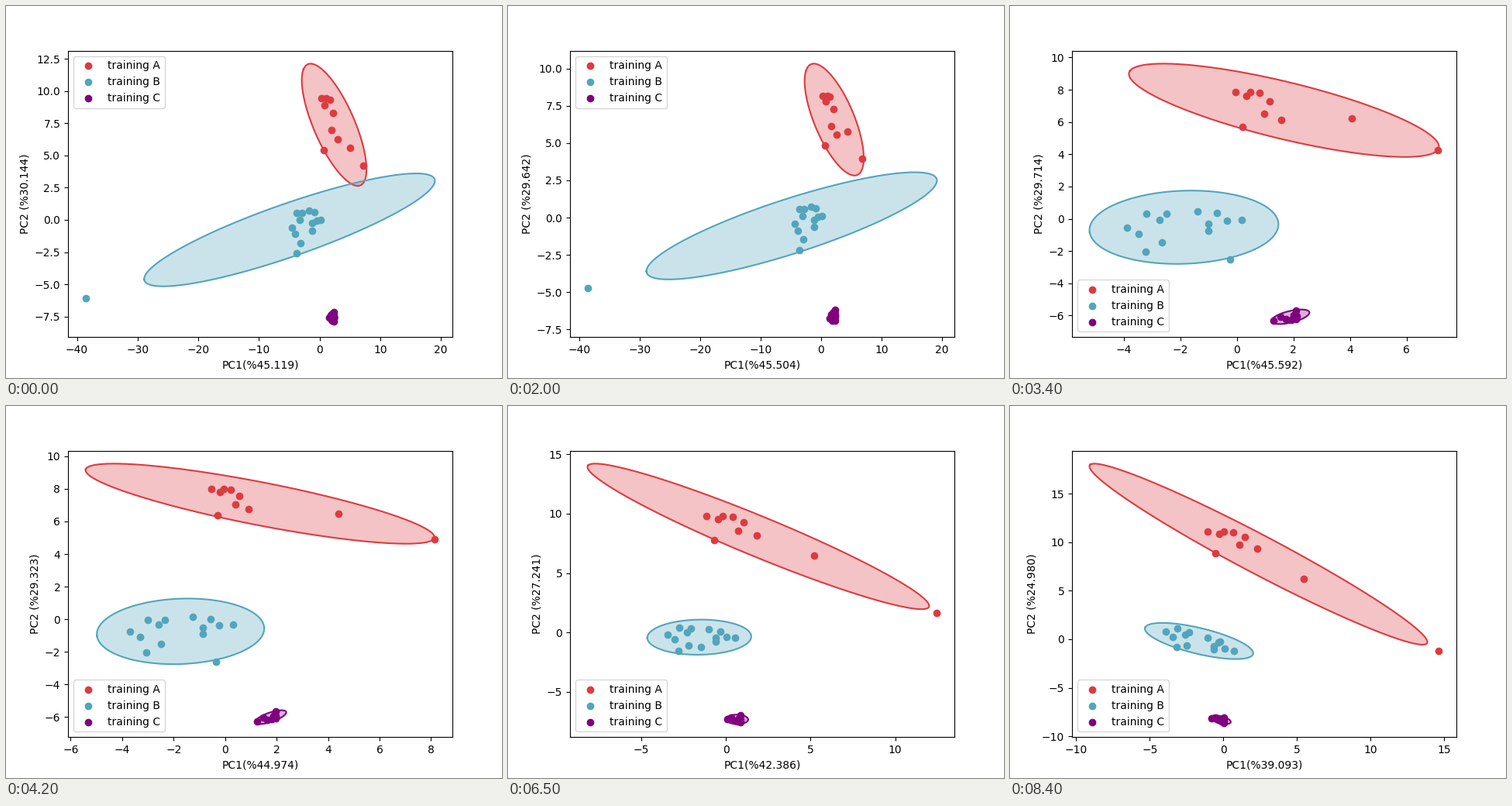
Write a matplotlib script that moves like this. It is 640x480 px and loops after 8.5 s.

```python
import numpy as np
import matplotlib.pyplot as plt
from matplotlib.animation import FuncAnimation

FRAMES, STEP_MS = 85, 100
CHI = 2.4477     # square root of the 95 % chi-square quantile, 2 d.o.f.


def path(*keys):
    """Piecewise linear path through (step, value, value, ...) keys."""
    steps, *columns = np.array(keys).T
    return lambda step: np.array([np.interp(step, steps, c) for c in columns])


def cluster(shape, move):
    """Points that follow a path of centre x, y, stretch x, y and tilt."""
    def at(step):
        cx, cy, sx, sy, tilt = move(step)
        dx = sx * shape[:, 0]
        return np.c_[cx + dx, cy + sy * shape[:, 1] + tilt * dx]
    return at


def blob(n, seed):
    """Seeded scatter with zero mean and unit covariance."""
    pts = np.random.default_rng(seed).uniform(-1, 1, (n, 2))
    pts -= pts.mean(axis=0)
    return pts @ np.linalg.inv(np.linalg.cholesky(np.cov(pts.T))).T


variance = path((0, 45.119, 30.144), (14, 44.965, 29.288), (27, 46.133, 30.056),
                (42, 44.974, 29.323), (56, 44.369, 28.664), (74, 40.403, 25.817),
                (84, 39.093, 24.980))

a_shape = np.array([(-1.2, 1.3), (-0.6, 0.85), (-0.35, 1.3), (0.15, 1.2),
                    (0.75, 0.3), (0.45, -0.95), (1.4, -1.6), (-0.8, -2.4)])
a_core = cluster(a_shape, path(
    (0, 1.49, 8.0, 1.04, 1.09, 0), (14, 1.49, 7.18, 1.04, 1.07, 0),
    (27, 1.18, 6.79, 0.69, 0.72, 0), (42, 0.14, 7.44, 0.55, 0.44, 0),
    (56, 0.07, 8.5, 1.06, 0.54, 0), (84, 0.5, 10.33, 1.3, 0.6, 0)))
a_near = path((0, 5.03, 5.6), (14, 4.95, 5.53), (27, 3.8, 6.03),
              (42, 4.39, 6.46), (56, 5.11, 6.59), (84, 5.44, 6.23))
a_far = path((0, 7.2, 4.23), (14, 7.26, 4.21), (27, 6.2, 3.7), (42, 8.15, 4.9),
             (56, 11.84, 2.46), (74, 13.1, 0.88), (84, 14.65, -1.2))

b_shape = np.array([(-1.2, 0.8), (-1.9, -0.2), (-0.75, 0.35), (-0.5, 0.8),
                    (0.6, 1.0), (1.3, 0.85), (-1.5, -0.65), (-0.65, -1.25),
                    (-1.25, -1.95), (1.0, 0.1), (2.2, 0.35), (1.65, 0.3),
                    (1.0, -0.4)])
b_core = cluster(b_shape, path(
    (0, -2.37, -0.38, 1.14, 1.12, 0), (14, -2.36, -0.28, 1.13, 1.0, 0),
    (27, -2.15, -0.185, 1.005, 0.97, 0), (42, -1.84, -0.6, 0.98, 0.73, 0),
    (56, -1.5, -0.42, 0.9, 0.72, 0), (84, -1.76, -0.18, 1.12, 0.7, -0.53)))
# The stray sample leaps into the group between steps 21 and 22
b_far = path((0, -38.6, -6.05), (14, -38.7, -5.0), (21, -38.7, -4.7),
             (22, -0.1, -2.4), (42, -0.34, -2.62), (56, -1.75, -1.18),
             (74, -1.24, -1.28), (84, -0.24, -0.24))

c_core = cluster(blob(10, 4), path(
    (0, 2.17, -7.58, 0.3, 0.207, 0), (14, 2.15, -7.05, 0.33, 0.225, 0),
    (27, 1.99, -6.145, 0.303, 0.174, 0.29), (42, 1.77, -6.0, 0.246, 0.124, 0.49),
    (56, 0.76, -6.91, 0.288, 0.155, 0.05), (74, 0.55, -7.73, 0.25, 0.17, -0.1),
    (84, -0.18, -8.3, 0.28, 0.156, -0.32)))

GROUPS = [("training A", "#dc3b40", (a_core, a_near, a_far)),
          ("training B", "#52a5bc", (b_core, b_far)),
          ("training C", "purple", (c_core,))]


def ellipse(pts):
    """95 % confidence ellipse, starting at the left tip of the long axis."""
    val, vec = np.linalg.eigh(np.cov(pts.T))
    major = vec[:, 1] * (-1 if vec[0, 1] > 0 else 1)
    minor = np.array([-major[1], major[0]])
    t = np.linspace(0, 2 * np.pi, 100)
    r = CHI * np.sqrt(val)
    return (pts.mean(axis=0) + r[1] * np.outer(np.cos(t), major)
            + r[0] * np.outer(np.sin(t), minor))


fig, ax = plt.subplots(figsize=(6.4, 4.8), dpi=100)


def draw(step):
    ax.clear()
    rings = []
    for name, color, parts in GROUPS:
        pts = np.vstack([part(step) for part in parts])
        ring = ellipse(pts)
        ax.fill(*ring.T, color=color, alpha=0.3, lw=0)
        ax.plot(*ring.T, color=color, lw=1.5)
        ax.scatter(*pts.T, color=color, label=name, zorder=3)
        rings.append(ring)
    pc1, pc2 = variance(step)
    ax.set_xlabel(f"PC1(%{pc1:.3f})")
    ax.set_ylabel(f"PC2 (%{pc2:.3f})")
    ax.autoscale_view()

    # Keep the legend clear of the ellipses
    (x0, x1), (y0, y1) = ax.get_xlim(), ax.get_ylim()
    rel = (np.concatenate(rings) - (x0, y0)) / (x1 - x0, y1 - y0)
    blocked = np.any((rel[:, 0] < 0.255) & (rel[:, 1] > 0.8))
    legend = ax.legend(loc="lower left" if blocked else "upper left")
    legend.set_zorder(5)
    return []


anim = FuncAnimation(fig, draw, frames=FRAMES, interval=STEP_MS,
                     init_func=lambda: draw(0), repeat=True, repeat_delay=0)
plt.show()
```
